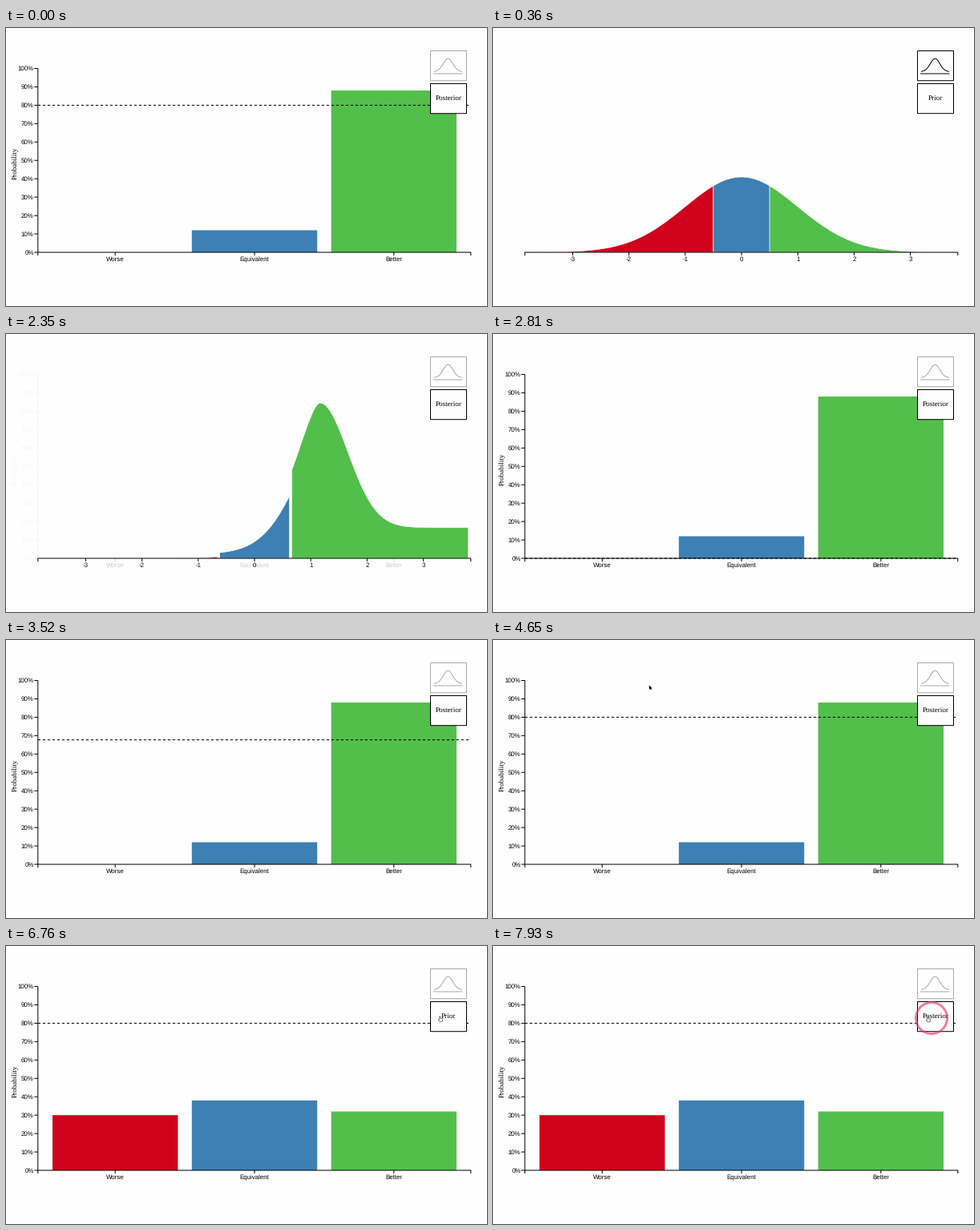
Animation of 600 by 347 pixels, one loop 8000 ms. Source, as a matplotlib script:

```python
import numpy as np
import matplotlib.pyplot as plt
from matplotlib.animation import FuncAnimation
from matplotlib.patches import Circle, Polygon, Rectangle

plt.rcParams.update({"path.snap": False, "text.hinting": "none"})

W, H, DPI = 600, 347, 100
LOOP, INTERVAL = 8000, 50
TICK = 165.5  # the picture only refreshes about six times a second
PT = 72 / DPI
LEFT, RIGHT, BASE, TOP = 39.8, 579.8, 280, 50.5
CENTER, UNIT = 310, 70.2
BAR_W, BAR_STEP = 156.4, 173.8
COLORS = ["#d0021b", "#3c80b4", "#53bf4b"]
NAMES = ["Worse", "Equivalent", "Better"]
PRIOR, POSTERIOR = [30, 38, 32], [0, 12, 88]
EDGES = [LEFT, CENTER - UNIT / 2, CENTER + UNIT / 2, RIGHT]
PAPER = "#fefefe"


def ease(t, start, duration):
    u = np.clip((t - start) / duration, 0, 1)
    return 4 * u ** 3 if u < .5 else 1 - 4 * (1 - u) ** 3


def mix(a, b, amount):
    return (1 - amount) * a + amount * b


def percent_y(value):
    return BASE - value / 100 * (BASE - TOP)


def prior_density(x):
    return 94 * np.exp(-x ** 2 / 2)


def posterior_density(x):
    d = x - 1.03
    return 192 * np.exp(-np.where(d < 0, 2.2 * abs(d) ** 1.65, 1.76 * d ** 2))


fig = plt.figure(figsize=(W / DPI, H / DPI), dpi=DPI, facecolor=PAPER)
ax = fig.add_axes([0, 0, 1, 1])
ax.set(xlim=(0, W), ylim=(H, 0))
ax.axis("off")


def line(xs, ys, z=4, **kw):
    return ax.plot(xs, ys, color="black", lw=PT, zorder=z,
                   solid_capstyle="butt", dash_capstyle="butt", **kw)[0]


def label(x, y, text, size=7.9, font="Liberation Sans", z=4, **kw):
    style = dict(ha="center", va="center_baseline") | kw
    return ax.text(x, y, text, fontsize=size * PT, family=font,
                   zorder=z, **style)


def button(y):
    return ax.add_patch(Rectangle((529.5, y), 45, 37.2, fc=PAPER, ec="black",
                                  lw=PT, zorder=6))


# Shapes that turn from density slices into bars
shapes = [ax.add_patch(Polygon([(0, 0), (1, 0), (1, 1)], fc=c, ec="white",
                               zorder=2)) for c in COLORS]

# Axes
line([LEFT, LEFT, RIGHT, RIGHT], [BASE + 4, BASE, BASE, BASE + 4])
number_axis, name_axis, percent_axis = [], [], []
for k in range(-3, 4):
    x = CENTER + k * UNIT
    number_axis += [line([x, x], [BASE, BASE + 4]), label(x, 288, str(k))]
for k, name in enumerate(NAMES):
    x = CENTER + (k - 1) * BAR_STEP
    name_axis += [line([x, x], [BASE, BASE + 4]), label(x, 288, name)]
percent_axis.append(line([LEFT, LEFT], [BASE, TOP]))
for value in range(0, 101, 10):
    y = percent_y(value)
    percent_axis += [line([LEFT - 4.5, LEFT], [y, y]),
                     label(LEFT - 5.2, y, f"{value}%", ha="right")]
percent_axis.append(label(11.5, 168.5, "Probability", 9.1, "Liberation Serif",
                          rotation=90, va="center"))
threshold = line([LEFT, 577], [0, 0], 5, dashes=(3.3, 2.7))

# Buttons
icon_box = button(28.5)
button(69.5)
bell = np.linspace(-17.5, 17.5, 50)
icon_lines = [line(551.4 + bell, 54.5 - 16.3 * np.exp(-(bell / 6) ** 2 / 2), 7),
              line([533, 569.5], [57, 57], 7)]
mode = label(552, 87.5, "", 9.15, "Liberation Serif", 7)

# Pointer
ARROW = np.array([(0, 0), (0, 4.4), (1, 3.5), (1.8, 5), (2.4, 4.7),
                  (1.8, 3.2), (3.1, 3.1)])
HAND = np.array([(-1.2, -2.8), (-.2, -2.8), (0, -.4), (2.6, .2), (2.6, 2.2),
                 (1.8, 4), (-1.2, 4), (-2.8, 1.2), (-1.2, 1.2)])
arrow = ax.add_patch(Polygon(ARROW, fc="black", ec="black", lw=.3, zorder=9))
hand = ax.add_patch(Polygon(HAND, fc="white", ec="#555555", lw=.5, zorder=9))
ring = ax.add_patch(Circle((547, 90), 19.5, fill=False, ec="#e4345a",
                           alpha=.62, lw=3 * PT, zorder=8))


def slice_outline(k, post, bars):
    """Outline of one region, blended between density slice and bar."""
    x = np.linspace(EDGES[k], EDGES[k + 1], 120)
    value = (x - CENTER) / UNIT
    height = mix(prior_density(value), posterior_density(value), post)
    middle = CENTER + (k - 1) * BAR_STEP
    bar_x = np.linspace(middle - BAR_W / 2, middle + BAR_W / 2, 120)
    bar_y = percent_y(mix(PRIOR[k], POSTERIOR[k], post))
    x = mix(x, bar_x, bars)
    y = mix(BASE - height, bar_y, bars)
    return np.column_stack([np.r_[x[0], x, x[-1]], np.r_[BASE, y, BASE]])


def set_alpha(artists, alpha):
    for artist in artists:
        artist.set_alpha(alpha)
        artist.set_visible(alpha > .01)


def update(frame):
    now = (frame + 1) * INTERVAL - 1
    t = now // TICK * TICK
    intro = now < 100

    post = 1 if intro else ease(t, 1134, 500) - ease(t, 6294, 500)
    bars = 1 if intro else ease(t, 2136, 500)
    for k, shape in enumerate(shapes):
        shape.set_xy(slice_outline(k, post, bars))
        shape.set_linewidth(.6 * PT * (1 - bars))

    set_alpha(number_axis, 1 - bars ** 2)
    set_alpha(name_axis, bars)
    set_alpha(percent_axis, bars ** 2)
    level = 80 if intro else 80 * ease(t, 2813, 1000)
    threshold.set_ydata([percent_y(level)] * 2)
    threshold.set_visible(intro or t > 2800)

    shade = "#aaaaaa" if bars > .01 else "black"
    icon_box.set_edgecolor(shade)
    for part in icon_lines:
        part.set_color(shade)
    prior_mode = not intro and (t < 1300 or 6400 < t < 7900)
    mode.set_text("Prior" if prior_mode else "Posterior")

    # The pointer drops in from the top, then glides to the button.
    keys = [4300, 4634, 5640, 7930]
    x = np.interp(t, keys, [200, 195, 541, 543])
    y = np.interp(t, keys, [5, 57, 90, 91])
    shown, over = t > 4200, x > 529
    arrow.set_xy(ARROW + (x, y))
    hand.set_xy(HAND + (x, y))
    arrow.set_visible(shown and not over)
    hand.set_visible(shown and over)
    ring.set_visible(6400 < t < 6700 or t > 7900)
    return []


anim = FuncAnimation(fig, update, frames=LOOP // INTERVAL, interval=INTERVAL,
                     repeat=True, repeat_delay=0)
plt.show()
```
